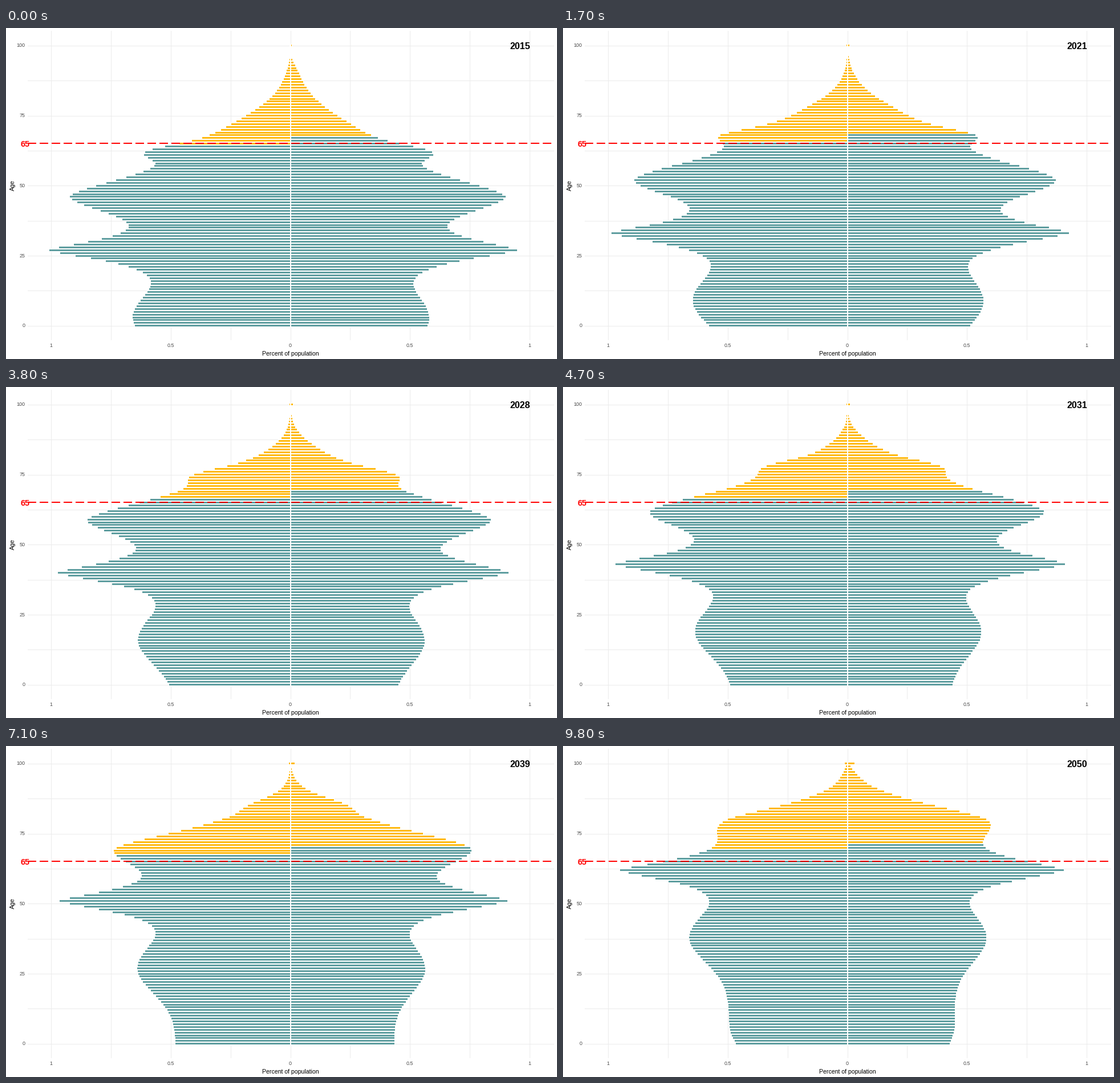
Write a matplotlib script that moves like this. It is 966 px wide and 580 px high and loops after 10000 ms.

```python
import numpy as np
import matplotlib.pyplot as plt
from matplotlib.animation import FuncAnimation
from matplotlib.collections import PolyCollection

W, H, DPI = 966, 580, 100
PX = 72 / DPI
MID, AGE0, PITCH, UNIT = 498.5, 521.8, 4.91, 419.6
TEAL, AMBER, GRID = "#5F9EA0", "#FFB90F", "#EBEBEB"
YEARS = [*range(2015, 2045), 2046, 2047, 2049, 2050]
AGES = np.arange(101)

# Swells in the birth cohorts: age in 2015, height in pixels, width, sharpness.
SWELLS = [(-37, -14, 5, 2), (3, 70, 12.3, 2), (27, 212, 5.5, 1.4),
          (46, 182, 8.5, 1.72), (62, 70, 3.4, 2), (98, -3, 8, 2)]
# Mortality level, slope and curvature; start and yearly rise of the old-age limit.
LEFT = dict(mort=(1.10, .1157, -.000533), limit=(64.5, .14))
RIGHT = dict(mort=(.79, .1176, -.00026), limit=(67.6, .12))


def sigmoid(x):
    return 1 / (1 + np.exp(-x))


def cohort(x, side):
    size = 207 * sigmoid((72 - x) / 5.8)
    for at, height, width, power in SWELLS:
        size = size + height * np.exp(-np.abs((x - at) / width) ** power)
    if side is RIGHT:
        size = size * (.882 - .001 * x + .14 * sigmoid((x - 25) / 5)
                       + np.exp((x - 90) / 7))
    return np.maximum(size, .5)


def hazard(age, t, mort):
    level, slope, curve = mort
    x = age - 80
    return level * np.exp(slope * x + curve * x * x - .0165 * t)


def widths(year, side):
    t = year - 2015
    start = AGES - t
    lost = hazard(AGES, t, side["mort"]) - hazard(start, 0, side["mort"])
    share = .963 + .00012 * (year - 2032) ** 2
    w = cohort(start, side) * np.exp(-lost) * share
    # The top bar gathers everyone of 100 and over.
    w[100] = (2.3 if side is RIGHT else .75) * np.exp(.048 * t)
    return w


def boxes(x0, x1, grow=0):
    top = np.round(AGE0 - 1.5 - PITCH * AGES) - grow
    bottom = top + 3 + 2 * grow
    x0, x1 = np.broadcast_arrays(x0, x1, top)[:2]
    corners = (x0, top), (x1, top), (x1, bottom), (x0, bottom)
    return np.stack([np.stack(p, -1) for p in corners], 1)


def colors(year, side):
    base, rise = side["limit"]
    limit = base + rise * (year - 2015)
    return [AMBER if a >= limit else TEAL for a in AGES]


fig = plt.figure(figsize=(W / DPI, H / DPI), dpi=DPI, facecolor="white")
ax = fig.add_axes([0, 0, 1, 1])
ax.set(xlim=(0, W), ylim=(H, 0))
ax.axis("off")


def label(x, y, s, size, color="black", **kw):
    kw = dict(ha="center", va="center") | kw
    return ax.text(x, y, s, fontsize=size * PX, color=color,
                   family="Liberation Sans", **kw)


for k in range(-4, 5):
    x = MID + k * UNIT / 4
    ax.plot([x, x], [5, 546], color=GRID, lw=PX, zorder=1)
    if k % 2 == 0:
        label(x, 556.5, f"{abs(k) / 4:g}", 9, "#4D4D4D")
for k in range(9):
    y = AGE0 - k * 12.5 * PITCH
    ax.plot([38, 960], [y, y], color=GRID, lw=PX, zorder=1)
    if k % 2 == 0:
        label(33.5, y, f"{k * 25 // 2}", 9, "#4D4D4D", ha="right")

label(498.5, 570.5, "Percent of population", 10.5)
label(11.5, 276, "Age", 10.5, rotation=90)

bars = PolyCollection([], linewidths=0, antialiaseds=False, zorder=2)
ax.add_collection(bars, autolim=False)
ax.plot([38, 960], [202, 202], color="red", lw=2 * PX, dashes=(7.5, 3),
        dash_capstyle="butt", antialiased=False, zorder=3)
label(33, 204.5, "65", 14.5, "red", weight="bold", zorder=4)
year_text = label(901.5, 32.5, "", 16, weight="bold", zorder=4)


def draw(i):
    year = YEARS[(i + 1) // 3]
    lx = np.minimum(MID - widths(year, LEFT), 498)
    rx = np.maximum(MID + widths(year, RIGHT), 500)
    bars.set_verts(np.concatenate([
        boxes(lx - 1, 499, 1), boxes(499, rx + 1, 1),
        boxes(lx, 498), boxes(500, rx)]))
    bars.set_facecolor(["white"] * 202 + colors(year, LEFT) + colors(year, RIGHT))
    year_text.set_text(str(year))
    return bars, year_text


anim = FuncAnimation(fig, draw, frames=100, interval=100, repeat=True,
                     repeat_delay=0, init_func=lambda: draw(0))
plt.show()
```
